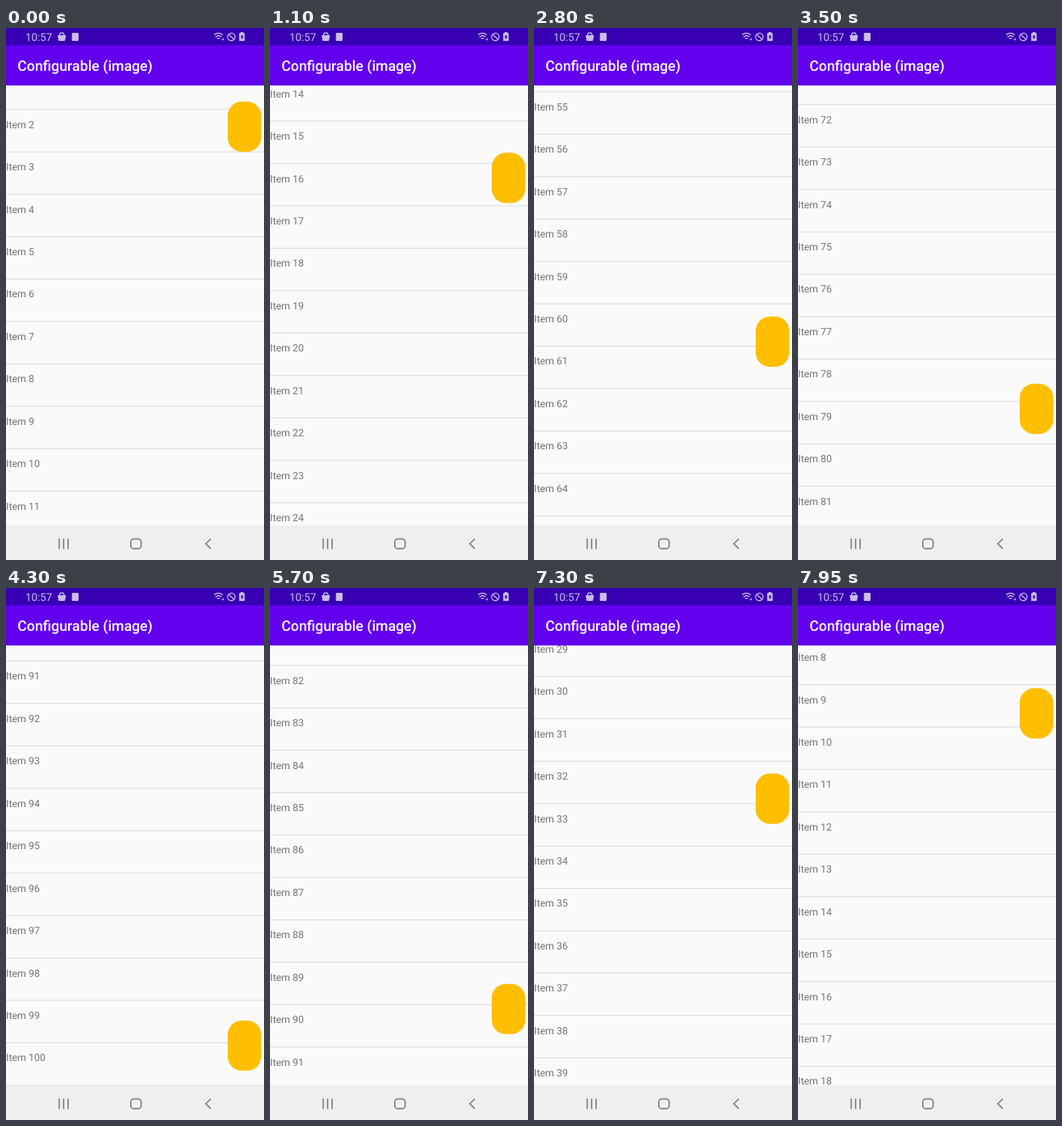
An HTML page for the animation above (8 s loop, 320 by 658 pixels).

```html
<!DOCTYPE html>
<html lang="en">
<head>
<meta charset="utf-8">
<title>Configurable fast scroll</title>
<style>
  html, body { margin: 0; width: 100%; height: 100%; overflow: hidden; background: #fafafa; }
  svg { display: block; width: 100vw; height: 100vh; }
  text { font-family: Roboto, Arial, sans-serif; text-rendering: geometricPrecision; }
</style>
</head>
<body>
<svg viewBox="0 0 320 658">
  <rect width="320" height="658" fill="#fafafa"/>
  <g id="list" font-size="12.44" fill="#757575" stroke-width=".95"></g>
  <rect id="thumb" x="275" width="41.5" height="62.2" rx="17.5" fill="#ffbf00"/>

  <rect width="320" height="71.1" fill="#6200ee"/>
  <rect width="320" height="21.3" fill="#3700b3"/>
  <text x="14.2" y="53.2" font-size="17.78" font-weight="500" fill="#fff">Configurable (image)</text>

  <g fill="#c9bce9" stroke="#c9bce9" stroke-width="0">
    <text x="24" y="15.8" font-size="13.3">10:57</text>
    <path d="M64 9h10.400l-1 5.800q-.2 1.200-1.400 1.200h-5.600q-1.200 0-1.400-1.200z"/>
    <path d="M66.500 9.500V8.500a2.700 2.700 0 0 1 5.400 0v1" fill="none" stroke-width="1.300"/>
    <rect x="81.700" y="6" width="8.300" height="10" rx="1"/>
    <g fill="none" stroke-width="1.300">
      <path d="M258 8.600q5.500-4.600 11 0M259.900 11q3.600-3 7.200 0M261.700 13.300q1.800-1.500 3.600 0"/>
      <path d="M267.500 14h3M269 12.500v3" stroke-width=".9"/>
      <circle cx="279.500" cy="11" r="4.700"/>
      <path d="M276.200 7.700l6.600 6.600"/>
    </g>
    <path d="M291.200 6v-1h2.800v1h1.200q.8 0 .8.800v8.400q0 .8-.8.800h-5.200q-.8 0-.8-.8V6.800q0-.8.800-.8z"/>
    <path d="M293.300 7.500l-2.500 4h1.500v3l2.400-4h-1.400z" fill="#3700b3"/>
  </g>

  <rect y="615.3" width="320" height="42.7" fill="#efefef"/>
  <g fill="none" stroke="#757575" stroke-width="1.5">
    <path d="M66 631.500v13M71.500 631.500v13M77 631.500v13"/>
    <rect x="154.800" y="631.900" width="12.800" height="12.200" rx="3.600"/>
    <path d="M254 632l-6.200 6 6.200 6"/>
  </g>
</svg>
<script>
const LOOP = 8000, STEP = 50, PITCH = 52.444, ITEMS = 100, ROWS = 13;
const SCROLL_START = -14.4, THUMB_TOP = 91, THUMB_RATIO = 0.0949;

// [time, scroll offset, easing power towards this point]
const keys = [
  [0, SCROLL_START, 1], [50, -11, 1], [150, -11, 1],
  [990, 515, 2], [1100, 653, 1], [2800, 2787, 1], [4300, 4663.4, 1],
  [5300, 4663.4, 1], [5542, 4457, 2], [5700, 4186.1, 1],
  [6600, 2642.6, 1], [7950, 333.9, 1]
];

function scrollAt(time) {
  const i = keys.findIndex(key => key[0] >= time);
  if (i <= 0) return keys[0][1];
  const [t0, from] = keys[i - 1], [t1, to, power] = keys[i];
  return from + (to - from) * ((time - t0) / (t1 - t0)) ** power;
}

const list = document.getElementById("list");
const thumb = document.getElementById("thumb");

function add(parent, tag, attrs = {}) {
  const node = document.createElementNS("http://www.w3.org/2000/svg", tag);
  for (const name in attrs) node.setAttribute(name, attrs[name]);
  return parent.appendChild(node);
}

const rows = Array.from({ length: ROWS }, () => {
  const group = add(list, "g");
  const label = add(group, "text", { x: 0, y: 4.4 });
  add(group, "path", { d: "M0 33.9H320", stroke: "#dadada" });
  return { group, label };
});

function draw(time) {
  const scroll = scrollAt(Math.floor(time / STEP) * STEP);
  const first = Math.floor((scroll + 50) / PITCH);
  rows.forEach(({ group, label }, i) => {
    const item = first + i;
    const visible = item >= 1 && item <= ITEMS;
    group.setAttribute("display", visible ? "inline" : "none");
    group.setAttribute("transform", `translate(0 ${(item * PITCH - scroll).toFixed(2)})`);
    label.textContent = `Item ${item}`;
  });
  thumb.setAttribute("y", (THUMB_TOP + (scroll - SCROLL_START) * THUMB_RATIO).toFixed(2));
}

const begin = performance.now();
function tick() {
  draw((performance.now() - begin) % LOOP);
  requestAnimationFrame(tick);
}
tick();
</script>
</body>
</html>
```
